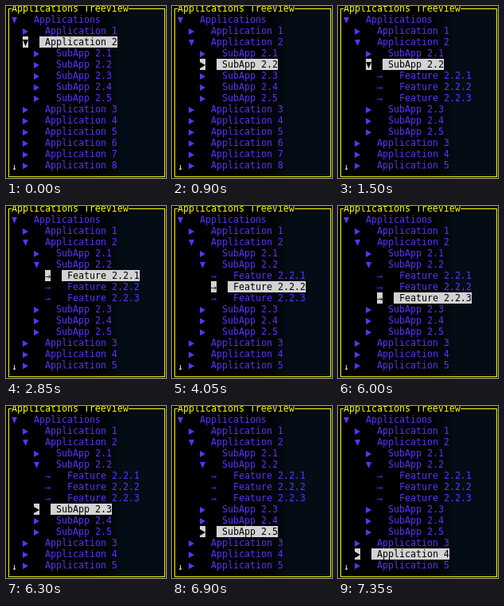
Animation, 201 px wide and 215 px high, one loop 8 s. Source, as an HTML page:

```html
<!DOCTYPE html>
<html lang="en">
<head>
<meta charset="utf-8">
<title>Tree view</title>
<style>
  html, body { margin: 0; width: 100%; height: 100%; overflow: hidden; background: #000; }
  #stage {
    position: relative; width: 201px; height: 215px; overflow: hidden;
    background: linear-gradient(90deg, #000 110px, #040d16 150px);
    color: #5a32ff;
    font: 11.627px/14px "DejaVu Sans Mono", monospace;
    font-variant-ligatures: none;
  }
  #stage > *, .row > * { position: absolute; white-space: pre; }
  .row { left: 0; width: 100%; height: 14px; }
  .icon { width: 7px; height: 14px; overflow: hidden; fill: currentColor; }
  .line { fill: none; stroke: currentColor; }
  .on > * { background: #d3d3d3; color: #000; }
  .frame { left: 3px; top: 3px; width: 195px; height: 209px; border: 1px solid #ffff00; }
  .title { left: 7px; top: -4px; color: #ffff00; }
  .title::before { content: ""; position: absolute; z-index: -1; inset: 0; background: #000; }
  .title { z-index: 0; }
  .more { left: 7px; top: 194px; color: #e4e4e4; }
</style>
</head>
<body>
<div id="stage">
  <div class="frame"></div>
  <div class="title">Applications TreeView</div>
  <div id="tree" style="left:0;top:10px;width:201px;height:196px"></div>
  <div class="more">↓</div>
</div>
<script>
const CELL = 7, ROW = 14, VISIBLE = 14, LOOP = 8000;

const ICONS = {
  closed: '<path d="M0 4L7 8L0 12Z"/>',
  open: '<path d="M0 4H7L3.5 12Z"/>',
  hollow: '<path class="line" d="M.5 4.8L6 8L.5 11.2Z"/>',
  leaf: '<path class="line" stroke-width=".8" d="M0 8.5H6.5M4.5 6.5L6.5 8.5L4.5 10.5"/>'
};

// Start time, selected row, whether SubApp 2.2 is open, icon override
const STEPS = [
  [0, 2, false],
  [600, 3, false],
  [900, 4, false],
  [1500, 4, true],
  [2850, 5, true],
  [4050, 6, true],
  [4800, 6, true, 'closed'],
  [4950, 6, true, 'hollow'],
  [5400, 6, true],
  [6000, 7, true],
  [6300, 8, true],
  [6600, 9, true],
  [6900, 10, true],
  [7200, 11, true],
  [7350, 12, true]
];

const range = n => Array.from({ length: n }, (_, i) => i + 1);

function treeRows(expanded) {
  const rows = [{ depth: 0, label: 'Applications', icon: 'open' }];
  for (const app of range(8)) {
    rows.push({ depth: 1, label: `Application ${app}`, icon: app === 2 ? 'open' : 'closed' });
    if (app !== 2) continue;
    for (const sub of range(5)) {
      const open = expanded && sub === 2;
      rows.push({ depth: 2, label: `SubApp 2.${sub}`, icon: open ? 'open' : 'closed' });
      if (!open) continue;
      for (const leaf of range(3)) {
        rows.push({ depth: 3, label: `Feature 2.2.${leaf}`, icon: 'leaf' });
      }
    }
  }
  return rows.slice(0, VISIBLE);
}

function rowHtml({ depth, label, icon }, index, selected, override) {
  const active = index === selected;
  const x = (1 + 2 * depth) * CELL;
  const shape = ICONS[active && override || icon];
  return `<div class="row${active ? ' on' : ''}" style="top:${index * ROW}px">` +
    `<svg class="icon" style="left:${x}px" viewBox="0 0 7 14">${shape}</svg>` +
    `<span style="left:${x + 3 * CELL}px"> ${label}</span></div>`;
}

const tree = document.getElementById('tree');
let shown = null;

function render(time) {
  const step = STEPS.findLast(([start]) => start <= time);
  if (step === shown) return;
  shown = step;
  const [, selected, expanded, override] = step;
  tree.innerHTML = treeRows(expanded)
    .map((row, i) => rowHtml(row, i, selected, override))
    .join('');
}

function tick() {
  render(performance.now() % LOOP);
  requestAnimationFrame(tick);
}
tick();
</script>
</body>
</html>
```
